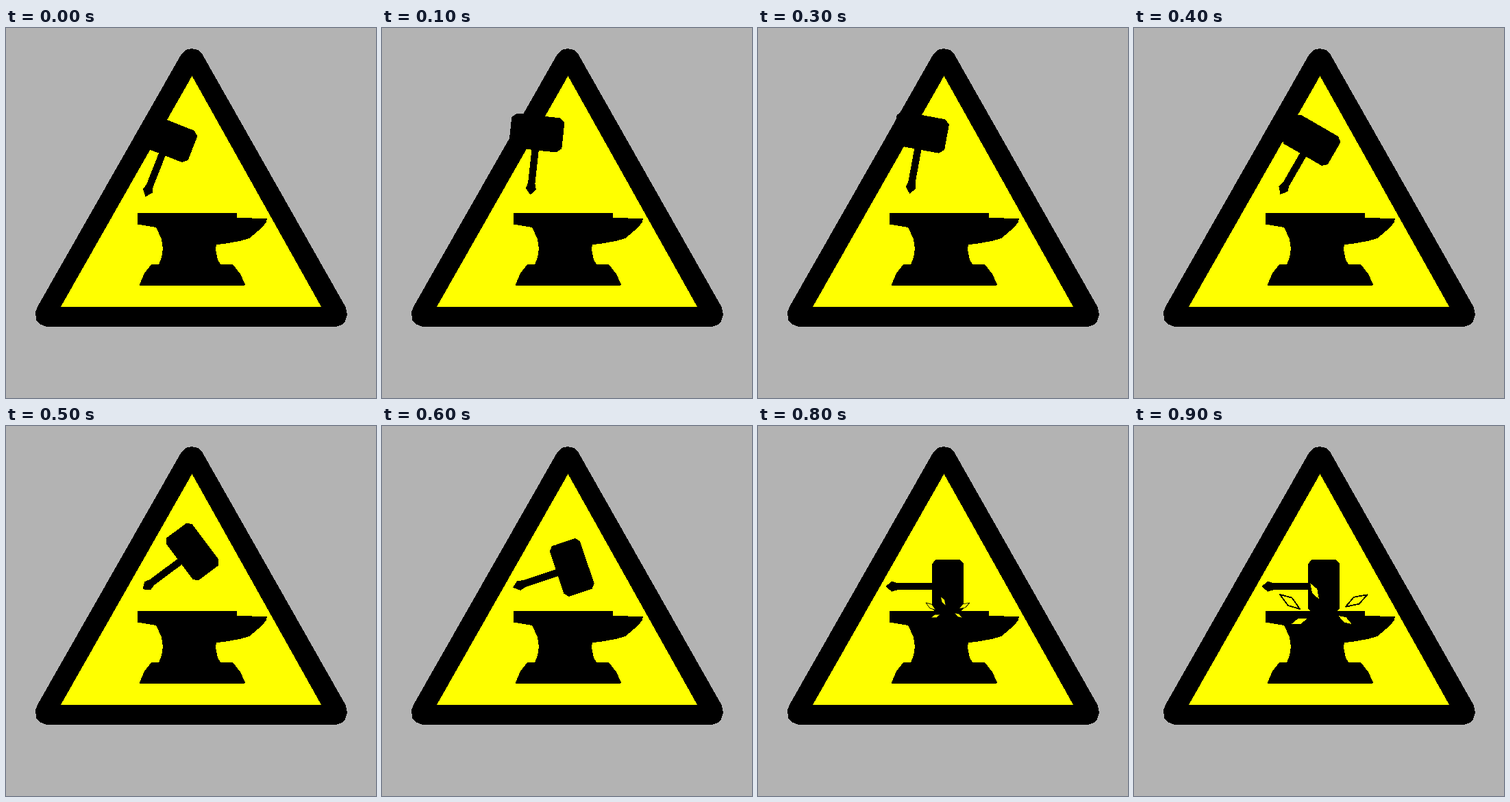
These frames come from a looping animation (540x540 px, 1 s). An HTML page:

```html
<!DOCTYPE html>
<html lang="en">
<head>
<meta charset="utf-8">
<title>Hammer and anvil sign</title>
<style>
  html, body { margin: 0; width: 100%; height: 100%; overflow: hidden; background: #b3b3b3; }
  svg { display: block; width: 100%; height: 100%; }
</style>
</head>
<body>
<svg viewBox="0 0 540 540" shape-rendering="crispEdges">
  <defs>
    <path id="spark" d="M-18 0L-1 -6.5L18 0L1 6Z"/>
  </defs>
  <path d="M256 38L262 32L271 30L280 32L286.3 38L495.5 407L498 418L495 428L490 433L483 435.6L59 436L49 432L44 426L43 414L47 405Z"/>
  <path fill="#ff0" d="M271.5 70L460 406.8H80Z"/>
  <path d="M192 270H337V277L381 278L380 283L374 291L355 307L341 311L318 315L307 316L306 323L309 338L313 345H331L342 359L349 374L348 376H195V374L202 358L212 345H223L227 335L229 322L227 308L219 291L192 286.5Z"/>
  <g id="hammer">
    <path d="M0 .5L9 -7L17 -4.7H76V5.7H17L9 8Z"/>
    <path id="head" transform="translate(91 0)"/>
  </g>
  <g id="sparks" fill="#ff0" stroke="#000" stroke-width="1.8" stroke-linejoin="round">
    <use href="#spark" transform="translate(227.5 256.5) rotate(36)"/>
    <use href="#spark" transform="translate(324.7 255) rotate(-29)"/>
    <use href="#spark" transform="translate(263.5 241) rotate(61) scale(.87)"/>
    <use href="#spark" transform="translate(241.5 285) rotate(-19) scale(.8)"/>
    <use href="#spark" transform="translate(308 283) rotate(32) scale(.74)"/>
  </g>
</svg>
<script>
  const LOOP = 1000, STEP = 100;
  const TURN = 200, DROP = 400, HIT = 800;
  const IMPACT = { x: 277, y: 270 };

  // grip position and tilt in degrees
  const low = { x: 203.1, y: 246, tilt: 68.5 };
  const high = { x: 228.7, y: 241, tilt: 99 };
  const aim = { x: 213, y: 242.5, tilt: 60 };
  const struck = { x: 186.2, y: 233.7, tilt: 0 };

  const [hammer, head, sparks] =
    ["hammer", "head", "sparks"].map(id => document.getElementById(id));

  const mix = (a, b, p) => a + (b - a) * p;
  const easeOut = (p, power) => 1 - (1 - p) ** power;

  // the grip may settle sooner than the tilt
  function blend(from, to, p, gripPower = 1, tiltPower = 1) {
    const grip = easeOut(p, gripPower);
    return {
      x: mix(from.x, to.x, grip),
      y: mix(from.y, to.y, grip),
      tilt: mix(from.tilt, to.tilt, easeOut(p, tiltPower))
    };
  }

  function pose(t) {
    if (t < TURN) return blend(low, high, t / TURN);
    if (t < DROP) return blend(high, aim, (t - TURN) / (DROP - TURN));
    return blend(aim, struck, Math.min(1, (t - DROP) / (HIT - DROP)), 2.5, 1.7);
  }

  // block with bevelled corners, centred on the origin
  function block(width, height, cut) {
    const x = width / 2, y = height / 2, a = x - cut, b = y - cut - 1;
    return `M${-a} ${-y}H${a}L${x} ${-b}V${b}L${a} ${y}H${-a}L${-x} ${b}V${-b}Z`;
  }

  function draw(time) {
    const t = Math.floor(time % LOOP / STEP) * STEP;
    const { x, y, tilt } = pose(t);
    hammer.setAttribute("transform", `translate(${x} ${y}) rotate(${-tilt})`);
    head.setAttribute("d", block(45.5 + tilt * 0.06, 77.5, 5 + tilt * 0.015));

    const spread = Math.max(0, (t - HIT + STEP) / (LOOP - HIT));
    sparks.setAttribute("visibility", spread ? "visible" : "hidden");
    sparks.setAttribute("transform",
      `translate(${IMPACT.x * (1 - spread)} ${IMPACT.y * (1 - spread)}) scale(${spread})`);
  }

  const start = performance.now();
  function tick() {
    draw(performance.now() - start);
    requestAnimationFrame(tick);
  }
  tick();
</script>
</body>
</html>
```
